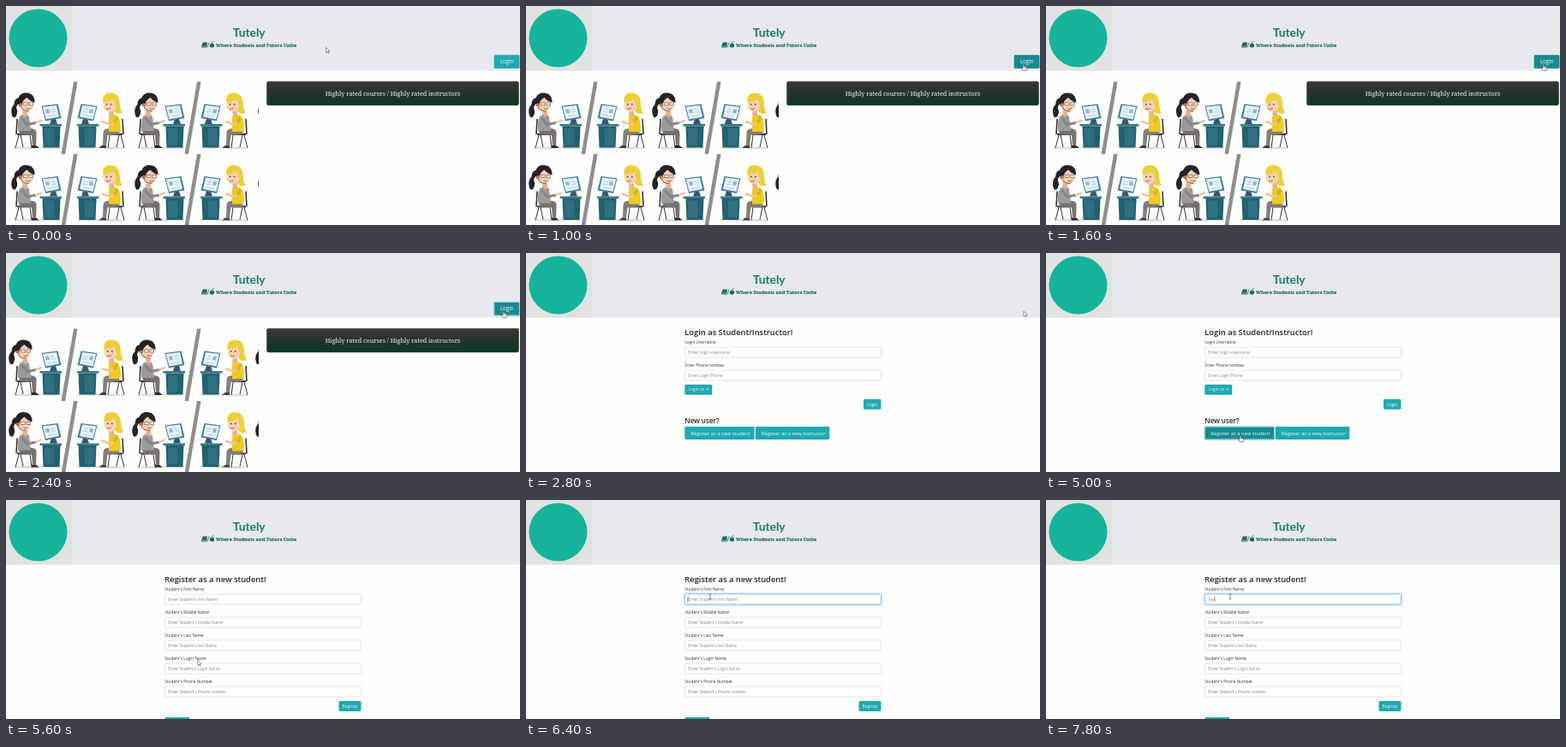
These frames come from a looping animation (600x256 px, 8 s). An HTML page:

```html
<!DOCTYPE html>
<html lang="en">
<head>
<meta charset="utf-8">
<title>Tutor portal</title>
<style>
  html, body { margin: 0; width: 100%; height: 100%; overflow: hidden; background: #fefefc; }
  svg { display: block; width: 600px; height: 256px; }
  text { font-family: "Open Sans", "Noto Sans", sans-serif; white-space: pre; }
  .serif { font-family: "Noto Serif", serif; }
  .brand { font: 700 13.8px Lato, sans-serif; fill: #1b776d; }
  .heading { font-weight: 600; fill: #1f2326; }
  .label { font-size: 4.75px; fill: #343a40; }
  .hint { font-size: 4.7px; fill: #7d858c; }
  .field { fill: #fff; stroke: #ced4da; stroke-width: .6; }
  .button rect { fill: #20a9b1; }
  .button text { fill: #effafa; }
  .hover rect { fill: #198a92; }
  .focus rect { stroke: #8fd0d5; stroke-width: 1.3; }
  .active { stroke: #80bdff; stroke-width: .8; filter: drop-shadow(0 0 .9px #66b0ff); }
</style>
</head>
<body>
<svg viewBox="0 0 600 256">
  <defs>
    <linearGradient id="bar" x2="0" y2="1">
      <stop stop-color="#3b3833"/><stop offset=".5" stop-color="#25332a"/><stop offset="1" stop-color="#083b22"/>
    </linearGradient>
    <clipPath id="panel"><rect y="88" width="295" height="168"/></clipPath>
    <g id="desk">
      <ellipse cx="52" cy="165.500" rx="14" ry="1.500" fill="#dededb"/>
      <path d="M39.500 138H65V140.500H39.500Z" fill="#35788d"/>
      <path d="M42.500 140.500H63.500L62.500 165.500H43.500Z" fill="#23616f"/>
      <path d="M45 143H56V163H45.500Z" fill="#2f7180"/>
      <path d="M53 132H58L60 138H51Z" fill="#3b5664"/>
      <path d="M41.500 117L60.500 114.500 64.500 131 46 134.500Z" fill="#3c7fa2"/>
      <path d="M42.800 118L59 116 62 129.500 46.500 132.500Z" fill="#e9f2f6"/>
      <path d="M46 121L50 120.500 51 125 47 125.500Z" fill="#8fb6cc"/>
      <path d="M52 121L57 120.500M53 124L58 123.500M49 129L58 127.500" stroke="#a9c6d6" stroke-width=".8"/>
    </g>
    <g id="chair" fill="none" stroke="#34343a">
      <path d="M15 151L11 166M17 151L20 165M28 151L30 166" stroke-width="1"/>
      <path d="M13 150H29" stroke-width="2"/>
      <path d="M13 132L12 150" stroke-width="1.600"/>
    </g>
    <g id="tile">
      <path d="M79 88.500H83.500L69 173H64.500Z" fill="#8e8e8e"/>
      <use href="#desk"/>
      <g id="caller">
        <ellipse cx="23" cy="166" rx="14" ry="1.400" fill="#dededb"/>
        <use href="#chair"/>
        <path d="M15 144L28 143Q36 143 35.500 149L35 163H31L30 151 16 150Z" fill="#77726e"/>
        <path d="M30 163H35L39 166H30Z" fill="#2d2b2b"/>
        <path d="M16 129Q22 124 27 129L29 146H14Q13 136 16 129Z" fill="#9b9b9e"/>
        <path d="M18 131L25 138.500 35 136.500" fill="none" stroke="#858588" stroke-width="3.200" stroke-linejoin="round"/>
        <path d="M35 136.500L41 134" stroke="#efbd98" stroke-width="2" stroke-linecap="round"/>
        <path d="M20 120H25V128L22.500 130 19 127Z" fill="#e8b18b"/>
        <g id="callerHead">
          <path d="M15 107Q9 108 9 115Q4 120 6.500 128Q8 132 11 129Q14 124 11.500 119Q12 114 17 114Z" fill="#252329"/>
          <ellipse cx="23.500" cy="115" rx="8" ry="9" fill="#f5d0b2"/>
          <path d="M14.500 117Q11 102 22.500 101.500Q33 101.500 33 113Q27 111 24 107Q19 109 17.500 117Z" fill="#252329"/>
          <path d="M20 113H24.500V116H20ZM26.500 113H31V116H26.500Z" fill="#f8f3ee" stroke="#5c4a4a" stroke-width=".6"/>
          <path d="M23 120Q26 121.500 28 119.500" fill="none" stroke="#c64946"/>
          <path d="M16.500 116Q17 123 26 123" fill="none" stroke="#4b4348" stroke-width=".8"/>
          <circle cx="16.500" cy="115.500" r="2" fill="#d96f3c"/>
        </g>
      </g>
      <use href="#desk" transform="matrix(-1 0 0 1 148 0)"/>
      <g id="tutor">
        <ellipse cx="125" cy="166" rx="14" ry="1.400" fill="#dededb"/>
        <use href="#chair" transform="matrix(-1 0 0 1 149 0)"/>
        <path d="M133 144L121 143Q113 143 113.500 149L113 163H117L118.500 151 132 150Z" fill="#857d77"/>
        <path d="M112 163H117V166H108Z" fill="#4b3a34"/>
        <path d="M120 129Q126 125 131 129Q135 137 133.500 147H120Z" fill="#f0cb1f"/>
        <path d="M129 132L122 138.500 112 135" fill="none" stroke="#f2c4a0" stroke-width="2.600" stroke-linejoin="round"/>
        <path d="M130 130L126 136" stroke="#ddb51a" stroke-width="4"/>
        <path d="M121 120H126V128L123 130 120 127Z" fill="#e8b18b"/>
        <g id="tutorHead">
          <path d="M114 115Q111 101 123 101.500Q132 102 133 113Q133 121 136 125Q129 128 126 122L115 121Z" fill="#ecd03a"/>
          <ellipse cx="121.500" cy="115.500" rx="7.500" ry="8.500" fill="#f6d0b0"/>
          <path d="M113.500 112Q116 104 124 104Q131 106 130 120Q127 115 125.500 109Q120 113 113.500 112Z" fill="#ecd03a"/>
          <path d="M117 115H118.500M122 115H123.500" stroke="#4a3c35" stroke-width="1.300"/>
          <path d="M117 120Q120 121.500 122 119.500" fill="none" stroke="#ca5049"/>
        </g>
      </g>
    </g>
  </defs>

  <rect width="600" height="256" fill="#fefefc"/>
  <rect width="600" height="75.500" fill="#e7e9ec"/>
  <rect width="77" height="75.500" fill="#e1e2e2"/>
  <circle cx="37.500" cy="37.500" r="34" fill="#16b39b"/>
  <text class="brand" x="283.700" y="36" text-anchor="middle">Tutely</text>
  <g fill="#17695f">
    <path d="M230 42.500H235L234 48.500H228.500Q227.500 47 228.500 46Z"/>
    <path d="M229 47.200H233.500" stroke="#dce8e6" stroke-width=".6"/>
    <path d="M235 48.500L237 42.500" stroke="#17695f" stroke-width=".8"/>
    <circle cx="240.500" cy="46" r="2.600"/>
    <path d="M240.500 43Q241 41.500 242.500 41.700" fill="none" stroke="#17695f" stroke-width=".8"/>
    <text class="serif" x="245" y="47.900" font-size="5.580" font-weight="700" stroke="#17695f" stroke-width=".15">Where Students and Tutors Unite</text>
  </g>
  <g id="home"></g>
  <g id="login"></g>
  <g id="register"></g>
  <g id="pointer" stroke-linejoin="round">
    <path id="arrow" d="M0 0V6L1.500 4.700 2.500 6.800 3.400 6.400 2.500 4.300H4.300Z" fill="#fff" stroke="#555" stroke-width=".6"/>
    <path id="hand" d="M-.8 .5Q0-.7 .8 .5V3L3.200 3.600Q4 4 3.600 5.500L3 7.500H-.6L-2.600 4.700Q-2.500 3.600-.8 4.400Z" fill="#fff" stroke="#333" stroke-width=".6"/>
    <path id="beam" d="M-1.300-2.800H1.300M0-2.800V2.800M-1.300 2.800H1.300" fill="none" stroke="#333" stroke-width=".6"/>
  </g>
</svg>
<script>
const LOOP = 8000, TICK = 200;
const $ = id => document.getElementById(id);
const fill = (id, ...parts) => { $(id).innerHTML = parts.join(""); };

const text = (cls, x, y, words, size, id = "") =>
  `<text class="${cls}" x="${x}" y="${y}" ${size ? `font-size="${size}"` : ""} id="${id}">${words}</text>`;

const button = (id, x, y, w, h, words, pad, size) =>
  `<g class="button" id="${id}"><rect x="${x}" y="${y}" width="${w}" height="${h}" rx="1.4"/>` +
  text("", x + pad, y + h / 2 + size * .36, words, size) + `</g>`;

const field = (id, row, label, hint) => {
  const y = 110 + row * 27;
  return text("label", 185.3, y - 4.5, label) +
    `<rect class="field" id="${id}" x="185.500" y="${y}" width="229" height="12" rx="1.300"/>` +
    text("hint", 189.3, y + 7.8, hint, 0, id + "Text");
};

const tiles = [0, 1].flatMap(row => [0, 1, 2].map(col =>
  `<use href="#tile" x="${col * 144}" y="${row * 84.5}"/>`));

fill("home",
  `<g clip-path="url(#panel)">${tiles.join("")}</g>`,
  `<rect x="304.500" y="88.200" width="294" height="27.800" rx="2" fill="url(#bar)" stroke="#28302b" stroke-width=".5"/>`,
  `<text class="serif" x="451.500" y="104.500" font-size="7.170" fill="#f4f4f2" text-anchor="middle">Highly rated courses / Highly rated instructors</text>`,
  button("enter", 569.7, 57.3, 29.8, 15.8, "Login", 7.2, 6.2));

fill("login",
  text("heading", 185.3, 95.5, "Login as Student/Instructor!", 9.35),
  field("user", 0, "Login Username", "Enter Login-username"),
  field("phone", 1, "Enter Phone number", "Enter Login Phone"),
  button("role", 185.3, 153.7, 32, 12, "Login as", 4.3, 4.8),
  `<path d="M210.300 158.700H213.300L211.800 160.300Z" fill="#fff"/>`,
  button("submit", 394, 170.8, 20.5, 12, "Login", 4.3, 4.8),
  text("heading", 185.3, 199, "New user?", 8.1),
  button("student", 185.3, 203, 81.3, 15, "Register as a new student", 7, 5.8),
  button("teacher", 267.8, 203, 86.5, 15, "Register as a new instructor", 7, 5.8));

const rows = [["First", "first"], ["Middle", "middle"], ["Last", "last"], ["Login", "Login"], ["Phone", "Phone"]];
fill("register",
  text("heading", 185.3, 95.5, "Register as a new student!", 9.35),
  ...rows.map(([label, hint], i) => field("entry" + i, i,
    `Student's ${label} ${i < 4 ? "Name" : "Number"}`,
    `Enter Student's ${hint} ${i < 4 ? "Name" : "number"}`)),
  `<path id="caret" d="M0 113V119" stroke="#333" stroke-width=".6"/>`,
  button("send", 388.5, 235, 26, 12, "Register", 4.3, 4.8),
  `<rect x="185.300" y="254" width="29" height="6" rx="1.400" fill="#20a9b1"/>`);

// time, x, y, pointer shape from that time on
const path = [
  [0, 373.5, 48.5, "arrow"], [200, 373.5, 48.5, "arrow"],
  [800, 581, 68, "hand"], [2800, 581, 68, "arrow"],
  [3600, 223, 198.5, "beam"], [4000, 223, 198.5, "beam"],
  [4400, 227, 213.5, "hand"], [5400, 227, 213.5, "arrow"],
  [6000, 215, 113, "beam"], [LOOP, 215, 113, "beam"]
];
const ease = p => p * p * (3 - 2 * p);
const move = (id, x, y) => $(id).setAttribute("transform", `translate(${x} ${y})`);
const show = (id, on) => { $(id).style.display = on ? "" : "none"; };
const flag = (id, cls, on) => $(id).classList.toggle(cls, on);
const hint = $("entry0Text").textContent;

function movePointer(t) {
  const i = path.findIndex((stop, k) => t >= stop[0] && t < path[k + 1][0]);
  const [t0, x0, y0, shape] = path[i], [t1, x1, y1] = path[i + 1];
  const p = ease((t - t0) / (t1 - t0));
  move("pointer", x0 + (x1 - x0) * p, y0 + (y1 - y0) * p);
  for (const id of ["arrow", "hand", "beam"]) show(id, id === shape);
}

function draw(t) {
  show("home", t < 2800);
  show("login", t >= 2800 && t < 5400);
  show("register", t >= 5400);
  flag("enter", "hover", t >= 800);
  flag("enter", "focus", t >= 2200);
  flag("student", "hover", t >= 4400);
  flag("student", "focus", t >= 4800);
  flag("entry0", "active", t >= 6200);

  const typed = "Tav".slice(0, Math.max(0, Math.floor((t - 7200) / 200)));
  const entry = $("entry0Text");
  entry.textContent = typed || hint;
  const end = typed ? entry.getComputedTextLength() + .4 : -.3;
  move("caret", 189.3 + end, 0);
  show("caret", t >= 6200 && (typed || (t - 6200) % 1060 < 530));

  const sway = -2.45 * Math.cos(2 * Math.PI * (t - 1000) / 1400);
  move("callerHead", sway, 0);
  move("tutorHead", -.4 * sway, 0);
  movePointer(t);
}

const start = performance.now();
function frame() {
  const t = (performance.now() - start) % LOOP;
  draw(Math.floor(t / TICK) * TICK);
  requestAnimationFrame(frame);
}
frame();
</script>
</body>
</html>
```
